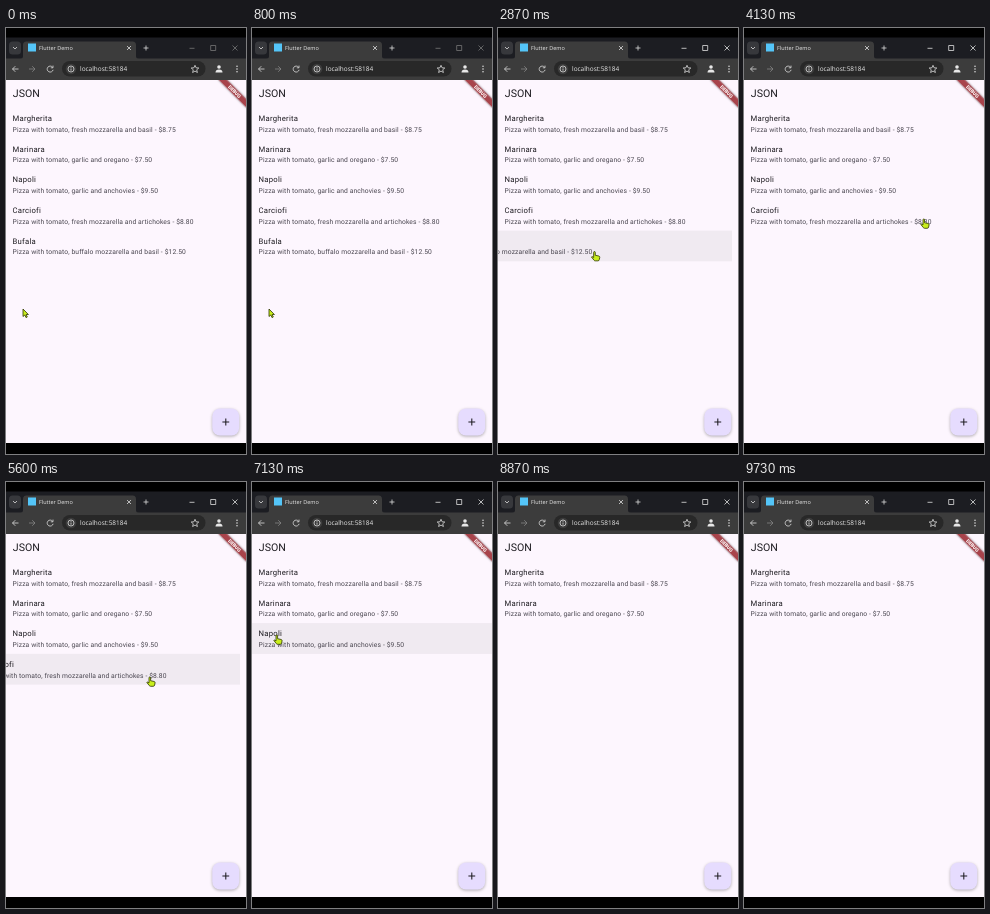
Recreate the animation shown at these times as an HTML page. Size 240 by 426 pixels, loop 9790 ms.

```html
<!DOCTYPE html>
<html lang="en">
<head>
<meta charset="utf-8">
<title>Swipe to dismiss</title>
<style>
  html, body { margin: 0; width: 100%; height: 100%; overflow: hidden; background: #000; }
  svg { display: block; width: 240px; height: 426px; }
  text { text-rendering: geometricPrecision; white-space: pre; }
  .ui { font-family: "Open Sans", sans-serif; fill: #e8e8e8; }
  .page { font-family: Roboto, sans-serif; fill: #1d1b20; }
  .sub { font-size: 6.73px; letter-spacing: .12px; fill: #49454f; }
  .name { font-size: 7.7px; letter-spacing: .24px; }
  .line { fill: none; stroke: #dcdcdc; stroke-width: .8; }
  .ink { fill: #1d1b20; fill-opacity: .055; }
  .fab { fill: #e6dcfe; filter: drop-shadow(0 1.5px 1.5px rgba(0, 0, 0, .3)); }
  .banner { fill: #a8434b; filter: drop-shadow(0 0 1.2px rgba(0, 0, 0, .5)); }
  .pointer path { fill: #c9ee1c; stroke: #2c3500; stroke-width: .8; stroke-linejoin: round; }
</style>
</head>
<body>
<svg viewBox="0 0 240 426">
  <rect width="240" height="426"/>

  <!-- tab strip -->
  <rect y="9.5" width="240" height="22" fill="#1c1d22"/>
  <rect x="3" y="13.5" width="12" height="13" rx="3.5" fill="#37383c"/>
  <path class="line" d="M7 19l2 2 2-2"/>
  <path d="M14 31q3 0 3-3V17q0-3.500 3.500-3.500H126.500q3.500 0 3.500 3.500V28q0 3 3 3z" fill="#3c3c3c"/>
  <rect x="22" y="15.500" width="8" height="8" fill="#54c5f8"/>
  <text class="ui" x="33" y="21.900" font-size="5.500">Flutter Demo</text>
  <path class="line" d="M121 18l4 4m0-4l-4 4M137.500 20h5m-2.500-2.500v5"/>
  <path class="line" id="controls" d="M183.500 20.300h5M204.700 17.500h5v5h-5zM226.500 17.500l5 5m0-5l-5 5"/>

  <!-- toolbar -->
  <rect y="30.500" width="240" height="21.500" fill="#3c3c3c"/>
  <path class="line" d="M12.500 41h-6m2.800-2.800L6.500 41l2.800 2.800"/>
  <path class="line" style="stroke:#858585" d="M23 41h6m-2.800-2.800L29 41l-2.800 2.800"/>
  <path class="line" d="M46.600 39.300a3 3 0 1 0 .5 2.500M47 37.600v2.200h-2.200"/>
  <rect x="56" y="33" width="143.500" height="15.500" rx="7.750" fill="#282828"/>
  <circle cx="65" cy="41" r="5.300" fill="#3c3c3c"/>
  <circle class="line" cx="65" cy="41" r="3"/>
  <path class="line" d="M65 40.500v2.200M65 39v.8"/>
  <text class="ui" x="74" y="43.200" font-size="6.450">localhost:58184</text>
  <path class="line" d="M189 37.300l1.100 2.500 2.700.2-2.100 1.800.7 2.700-2.400-1.400-2.400 1.400.7-2.700-2.100-1.800 2.700-.2z"/>
  <g fill="#e8e8e8">
    <circle cx="213" cy="39" r="1.800"/>
    <path d="M209.500 44.500q0-3 3.500-3t3.500 3z"/>
    <circle cx="231" cy="38.300" r=".75"/>
    <circle cx="231" cy="41" r=".75"/>
    <circle cx="231" cy="43.700" r=".75"/>
  </g>

  <!-- page -->
  <svg y="52" width="240" height="363" viewBox="0 52 240 363">
    <rect y="52" width="240" height="363" fill="#fdf6fe"/>
    <text class="page" x="6.800" y="69.300" font-size="10.600">JSON</text>
    <g id="list"></g>
    <g transform="translate(240 52) rotate(45)">
      <rect class="banner" x="-20" y="13.400" width="40" height="5.800"/>
      <text class="page" y="18" font-size="4.900" font-weight="900" text-anchor="middle" style="fill:#fff">DEBUG</text>
    </g>
    <rect class="fab" x="206.300" y="380.600" width="26.900" height="26.900" rx="7.700"/>
    <path d="M216.400 394h6.800m-3.400-3.400v6.800" stroke="#1d1b20" stroke-width="1.050"/>
  </svg>

  <g class="pointer" id="pointer">
    <path id="arrow" d="M0 0v7.500l1.800-1.500 1.200 2.600 1.300-.6-1.200-2.500h2.300z"/>
    <path id="hand" d="M-1 .8q0-.8.8-.8t.8.8v2.900l3.600.8q1 .3.900 1.300l-.5 2.300q-.2 1.200-1.400 1.200h-2.600q-.8 0-1.300-.7l-2.500-3.200q.6-.9 2.200.5z"/>
  </g>
</svg>

<script>
const LOOP = 9790, FRAME = 1000 / 15;
const TOP = 79.700, STEP = 30.720, WIDTH = 240;
const FOCUS_AT = 2400, HOVER_LAG = 100;

// swipe: [ms, offset]
const rows = [
  { name: 'Margherita', sub: 'fresh mozzarella and basil - $8.75' },
  { name: 'Marinara', sub: 'garlic and oregano - $7.50' },
  { name: 'Napoli', sub: 'garlic and anchovies - $9.50',
    swipe: [[7400, 0], [7850, 125], [8050, 240]] },
  { name: 'Carciofi', sub: 'fresh mozzarella and artichokes - $8.80',
    swipe: [[5350, 0], [5600, -27], [5900, -122], [6100, -240]] },
  { name: 'Bufala', sub: 'buffalo mozzarella and basil - $12.50',
    swipe: [[2450, 0], [3000, -113], [3200, -240]] }
];

// [ms, x, y]
const path = [
  [0, 17, 281], [900, 17, 281], [1300, 95, 176], [1500, 128, 168],
  [1600, 142, 188], [1900, 190, 222], [2400, 190, 222], [3000, 70, 224],
  [3400, 70, 224], [3990, 175, 222], [4133, 180, 191], [5350, 172, 193],
  [5600, 144, 195], [5900, 50, 195], [6300, 50, 195], [6800, 24, 165],
  [7133, 25, 153], [7350, 25, 153], [7850, 160, 156], [8100, 190, 160],
  [8500, 248, 200]
];

const $ = id => document.getElementById(id);

function add(parent, tag, attrs, text = '') {
  const el = document.createElementNS('http://www.w3.org/2000/svg', tag);
  for (const key in attrs) el.setAttribute(key, attrs[key]);
  el.textContent = text;
  return parent.appendChild(el);
}

function sample(track, t, col = 1) {
  const i = track.findIndex(key => key[0] > t);
  if (i < 0) return track[track.length - 1][col];
  if (i === 0) return track[0][col];
  const a = track[i - 1], b = track[i];
  return a[col] + (b[col] - a[col]) * (t - a[0]) / (b[0] - a[0]);
}

const shift = (row, t) => row.swipe ? sample(row.swipe, t) : 0;

function hovered(t) {
  const row = rows[Math.floor((sample(path, t, 2) - TOP) / STEP)];
  const inside = sample(path, t) < WIDTH;
  return row && inside && Math.abs(shift(row, t)) < 200 ? row : null;
}

rows.forEach((row, i) => {
  const y = TOP + i * STEP;
  row.ink = add($('list'), 'rect', { class: 'ink', y, width: WIDTH, height: STEP });
  row.body = add($('list'), 'g', {});
  add(row.body, 'text', { class: 'page name', x: 6.600, y: y + 13.300 }, row.name);
  add(row.body, 'text', { class: 'page sub', x: 6.600, y: y + 23.900 }, 'Pizza with tomato, ' + row.sub);
});

function draw(t) {
  const lit = hovered(Math.max(0, t - HOVER_LAG));
  for (const row of rows) {
    const dx = shift(row, t);
    row.body.setAttribute('transform', `translate(${dx})`);
    row.body.style.display = Math.abs(dx) < WIDTH ? '' : 'none';
    // the highlight trails the swiped row
    row.ink.setAttribute('x', Math.max(-6, Math.min(6, dx * .22)));
    row.ink.style.display = row === lit ? '' : 'none';
  }
  const over = hovered(t);
  $('hand').style.display = over ? '' : 'none';
  $('arrow').style.display = over ? 'none' : '';
  $('pointer').setAttribute('transform', `translate(${sample(path, t)} ${sample(path, t, 2)})`);
  $('controls').style.stroke = t < FOCUS_AT ? '#777' : '#e0e0e0';
}

const start = performance.now();
function tick() {
  const t = (performance.now() - start) % LOOP;
  draw(Math.floor(t / FRAME + .1) * FRAME);
  requestAnimationFrame(tick);
}
tick();
</script>
</body>
</html>
```
